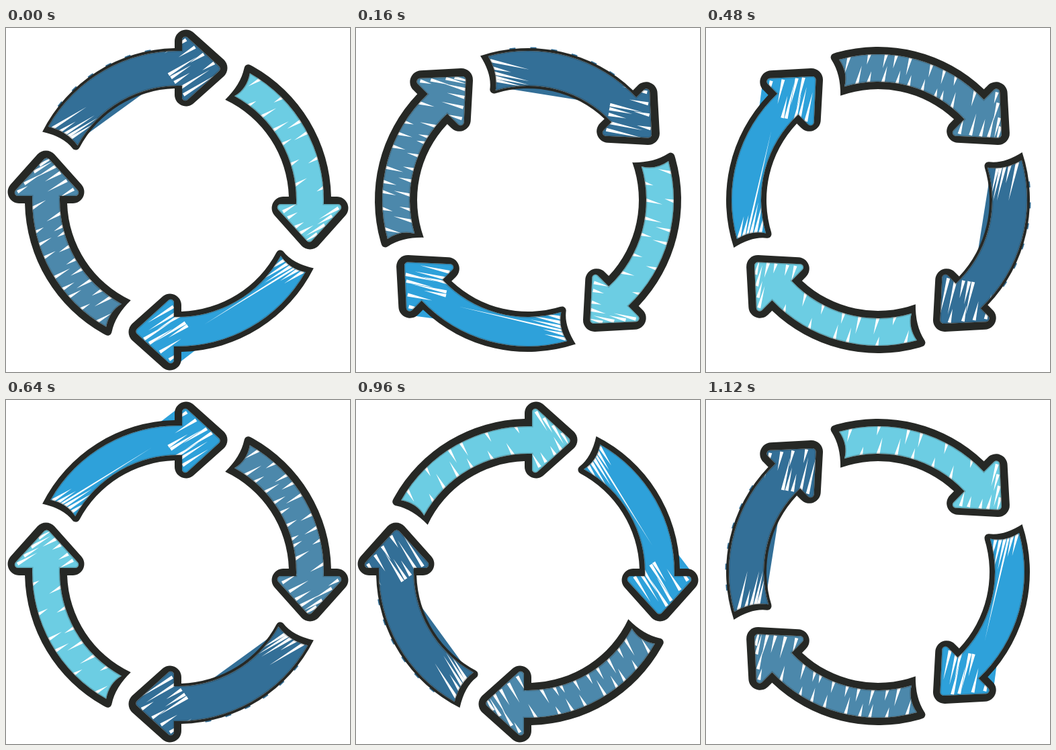
Recreate the animation shown at these times as an HTML page with a canvas. Size 512x512 px, loop 1280 ms.

```html
<!DOCTYPE html>
<html lang="en">
<head>
<meta charset="utf-8">
<title>Cycle arrows</title>
<style>
html, body { margin: 0; width: 100%; height: 100%; overflow: hidden; background: #fff; }
canvas { display: block; width: 100vw; height: 100vh; }
</style>
</head>
<body>
<canvas id="stage" width="512" height="512"></canvas>
<script>
const ctx = document.getElementById('stage').getContext('2d');
const C = 256, STEP = 160, STEPS = 8;
const INK = '#262825';
const rad = deg => deg * Math.PI / 180;
const polar = (r, deg) => [C + r * Math.cos(rad(deg)), C + r * Math.sin(rad(deg))];

function seeded(seed) {
  return () => {
    seed = (seed * 16807) % 2147483647;
    return seed / 2147483647;
  };
}

// Every arrow is built in the pose it has at the top of the ring.
// corner: which end of the tail is rounded, 'in', 'out' or none.
function arrowPath({ outer, inner, tail, neck, mid, tip, half, round, corner }) {
  const p = new Path2D();
  const neckAngle = r => -Math.acos((neck - C) / r);
  const bend = polar(195, tail + 2.3);
  p.arc(C, C, outer, rad(corner === 'out' ? tail + 3 : tail), neckAngle(outer));
  p.arcTo(neck, mid - half, tip, mid, round);
  p.arcTo(tip, mid, neck, mid + half, round);
  p.arcTo(neck, mid + half, neck, mid, round);
  p.arc(C, C, inner, neckAngle(inner), rad(corner === 'in' ? tail + 1 : tail - 1), true);
  if (corner === 'in') p.arcTo(...polar(inner - 1, tail - 2.3), ...bend, 6);
  if (corner === 'out') {
    p.quadraticCurveTo(...bend, ...polar(outer - 9, tail + 0.5));
    p.arcTo(...polar(outer, tail), ...polar(outer, tail + 3), 6);
  } else {
    p.quadraticCurveTo(...bend, ...polar(outer, tail));
  }
  p.closePath();
  return p;
}

const edgeHead = { neck: 251, mid: 59.5, tip: 338, half: 78, round: 17 };
const fillHead = { neck: 262, mid: 60.5, tip: 321, half: 54, round: 5 };
const sharpEdge = arrowPath({ ...edgeHead, outer: 226, inner: 166, tail: -153.3, corner: 'in' });
const roundEdge = arrowPath({ ...edgeHead, outer: 228, inner: 165, tail: -153.8, corner: 'out' });
const fillPath = (outer, inner) => arrowPath({ ...fillHead, outer, inner, tail: -150.5 });

// Edges from which the white pencil gaps start, each a function of 0..1.
const line = (a, b) => t => [a[0] + (b[0] - a[0]) * t, a[1] + (b[1] - a[1]) * t];
const bow = r => t => polar(r, -149 + 57 * t);
const headTop = line([264, 14], [314, 55]);
const headLow = line([268, 104], [314, 68]);
const headBack = line([238, 64], [266, 102]);
const tailEnd = line([67, 148], [100, 168]);

// Gaps spread along an edge: [edge, count, shortest, longest].
const across = n => [[bow(218), n, 12, 28], [bow(175), n, -12, -30], [headTop, 4, 16, 34], [headLow, 4, -14, -34]];
const along = [[tailEnd, 5, 24, 62], [headBack, 5, 24, 58], [headTop, 4, -16, -50]];

const arrows = [
  { color: '#336f97', edge: sharpEdge, fill: fillPath(222, 170), slant: -32, gaps: along, spill: spillDark },
  { color: '#6ccde3', edge: roundEdge, fill: fillPath(217, 176), slant: 60, gaps: across(6) },
  { color: '#2ea1da', edge: sharpEdge, fill: fillPath(218, 174), slant: -32, spill: spillBlue,
    gaps: [...along, [line([80, 155], [84, 155]), 1, 155, 160]] },
  { color: '#4c88ab', edge: roundEdge, fill: fillPath(217, 176), slant: 60, gaps: across(9) }
];

for (const a of arrows) {
  a.ring = new Path2D(a.edge);
  a.ring.addPath(a.fill);
}

// Colour that runs past the outline.
function spillDark() {
  ctx.beginPath();
  ctx.arc(C, C, 167, rad(-144), rad(-108));
  ctx.fill();
  ctx.beginPath();
  ctx.arc(C, C, 225.5, rad(-142), rad(-98));
  ctx.setLineDash([9, 22]);
  ctx.lineWidth = 4;
  ctx.stroke();
  ctx.setLineDash([]);
}

function spillBlue() {
  ctx.beginPath();
  ctx.moveTo(...polar(222, -98));
  ctx.lineTo(254, 14);
  ctx.lineTo(254, 34);
  ctx.fill();
}

// A white wedge: wide at its start, pointed at its end.
function wedge([x, y], len, slant) {
  const dx = Math.cos(rad(slant)), dy = Math.sin(rad(slant));
  const w = Math.abs(len) > 100 ? 1.6 : 2.5;
  ctx.beginPath();
  ctx.moveTo(x - dy * w, y + dx * w);
  ctx.lineTo(x + dx * len, y + dy * len);
  ctx.lineTo(x + dy * w, y - dx * w);
  ctx.fill();
}

function drawGaps(a, seed) {
  const rnd = seeded(seed);
  for (const [edge, count, min, max] of a.gaps) {
    for (let i = 0; i < count; i++) {
      const at = edge((i + 0.2 + 0.6 * rnd()) / count);
      wedge(at, min + (max - min) * rnd(), a.slant);
    }
  }
}

function turned(angle, paint) {
  ctx.save();
  ctx.translate(C, C);
  ctx.rotate(angle);
  ctx.translate(-C, -C);
  paint();
  ctx.restore();
}

function drawArrow(a, i) {
  ctx.fillStyle = ctx.strokeStyle = a.color;
  if (a.spill) a.spill();
  ctx.fill(a.fill);

  ctx.save();
  ctx.clip(a.fill);
  ctx.fillStyle = '#fff';
  drawGaps(a, 7919 * (i + 3));
  ctx.strokeStyle = 'rgba(38,40,37,.25)';
  ctx.lineWidth = 3;
  ctx.stroke(a.fill);
  ctx.restore();

  ctx.fillStyle = INK;
  ctx.fill(a.ring, 'evenodd');
}

function draw(time) {
  const step = Math.floor(time / STEP) % STEPS;
  ctx.fillStyle = '#fff';
  ctx.fillRect(0, 0, 512, 512);
  arrows.forEach((a, i) => turned(step * Math.PI / 4 + i * Math.PI / 2, () => drawArrow(a, i)));
}

const start = performance.now();
function tick() {
  draw(performance.now() - start);
  requestAnimationFrame(tick);
}
tick();
</script>
</body>
</html>
```
